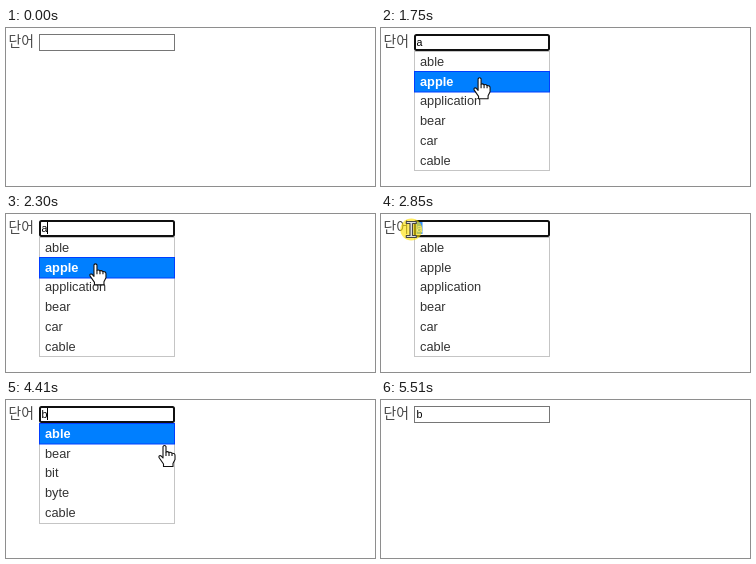
An HTML page that plays this animation: 369x158 px, repeating every 5640 ms.

```html
<!DOCTYPE html>
<html lang="ko">
<head>
<meta charset="utf-8">
<title>Autocomplete</title>
<style>
html, body { margin: 0; width: 100%; height: 100%; overflow: hidden; background: #fff; }
svg { display: block; width: 369px; height: 158px; }
text { font-family: "Liberation Sans", Arial, sans-serif; white-space: pre; }
.label { font: 300 13.8px "Noto Sans CJK KR", "Noto Sans CJK", sans-serif; fill: #444; }
.value { font-size: 10.67px; fill: #000; }
.value.picked { fill: #fff; }
.row text { font-size: 12.8px; fill: #333; }
.row rect { fill: #007fff; stroke: #003eff; visibility: hidden; }
.row.active text { fill: #fff; font-weight: bold; }
.row.active rect { visibility: visible; }
.cursor { fill: #fff; stroke: #111; stroke-width: 1.1; stroke-linejoin: round; }
</style>
</head>
<body>
<svg viewBox="0 0 369 158">
  <text class="label" x="2.5" y="17.5">단어</text>
  <g id="list"></g>
  <rect id="field" fill="#fff"/>
  <rect id="pick" x="35.5" y="8" width="6" height="12" fill="#3390ff"/>
  <text id="value" class="value" x="35.5" y="18"></text>
  <rect id="caret" y="8" width="1" height="12"/>
  <circle id="press" r="11" fill="#ffe100" fill-opacity=".62"/>
  <g id="pointer" class="cursor">
    <path id="arrow" d="M0 0V16L3.7 12.5L6.2 18.3L8.6 17.2L6.2 11.6H11.3Z"/>
    <path id="beam" fill="#ddd" stroke="#444" d="M-5-8H5V-6H1.3V6H5V8H-5V6H-1.3V-6H-5Z"/>
    <g id="hand" transform="translate(0 1.5)">
      <path d="M-1.5 1.5Q0-.5 1.5 1.5V7Q3 6 4.5 7.5Q6 6.7 7.5 8.2Q10.5 8 10.5 10.5V14.5L8.5 18.5V21.5H-1V19L-5.5 12.5Q-6 10-3.5 10.8L-1.5 13Z"/>
      <path fill="none" d="M1.5 7V11M4.5 7.5V11M7.5 8.2V11"/>
    </g>
  </g>
</svg>
<script>
const LOOP = 5640, STEP = 68.75, ROW = 19.7;
const $ = id => document.getElementById(id);
const show = (id, on) => $(id).style.display = on ? '' : 'none';
const set = (id, attrs) => {
  for (const k in attrs) $(id).setAttribute(k, attrs[k]);
};

const lists = {
  a: ['able', 'apple', 'application', 'bear', 'car', 'cable'],
  b: ['able', 'bear', 'bit', 'byte', 'cable']
};

// Pointer paths: each is a run of [ms, x, y], held until its end time.
const paths = [
  { end: 1410, keys: [[70, 298, 140], [280, 185, 68], [480, 95, 8.5]] },
  { end: 2030, keys: [[1410, 95, 8.5], [1750, 98.5, 46.5], [1960, 103, 120]] },
  { end: 2780, keys: [[2030, 103, 135], [2300, 90, 48.5], [2580, 60, 12]] },
  { end: 3210, keys: [[2780, 46, 13], [2850, 30, 15.5], [2990, 15, 14]] },
  { end: 5240, keys: [[4410, 158.5, 43.5], [4620, 232, 75], [4970, 318, 140], [5240, 308, 160]] }
];

function pointerAt(t) {
  const path = paths.find(p => t >= p.keys[0][0] && t < p.end);
  if (!path) return null;
  const { keys } = path, start = keys[0][0];
  const q = start + STEP * Math.floor((t - start) / STEP + .1);
  const i = keys.findIndex(k => k[0] > q);
  if (i < 0) return keys[keys.length - 1].slice(1);
  const [t0, x0, y0] = keys[i - 1], [t1, x1, y1] = keys[i];
  const f = (q - t0) / (t1 - t0);
  return [x0 + (x1 - x0) * f, y0 + (y1 - y0) * f];
}

const listAt = t => t < 1210 || t >= 5510 ? null : t < 3410 ? 'a' : 'b';

function rowAt(t) {
  const p = pointerAt(t), items = lists[listAt(t)];
  if (!p || !items || p[0] < 33 || p[0] > 169) return -1;
  const i = Math.floor((p[1] - 24) / ROW);
  return i < items.length ? i : -1;
}

// The highlight lingers briefly after the pointer leaves the list.
function activeRow(t) {
  for (let k = 0; k < 4; k++) {
    const row = rowAt(t - k * STEP);
    if (row >= 0) return row;
  }
  return -1;
}

let shown;
function drawList(name, active) {
  const state = name + active;
  if (state === shown) return;
  shown = state;
  const items = lists[name] || [];
  const row = (word, i) => `<g class="row ${i === active ? 'active' : ''}">
    <rect x="33.5" y="${Math.round(23 + ROW * i) + .5}" width="135" height="20.5"/>
    <text x="39" y="${38 + ROW * i}">${word}</text></g>`;
  $('list').innerHTML = name
    ? `<rect x="33.5" y="23.5" width="135" height="${Math.round(items.length * ROW + 1)}" fill="#fff" stroke="#c5c5c5"/>`
      + items.map(row).join('')
    : '';
}

function drawField(t, hover) {
  const focus = t >= 680 && t < 5510;
  set('field', focus
    ? { x: 34, y: 7, width: 134, height: 15, rx: 1.5, stroke: '#101010', 'stroke-width': 2 }
    : { x: 33.5, y: 6.5, width: 135, height: 16, rx: 0, stroke: hover ? '#4f4f4f' : '#767676', 'stroke-width': 1 });
  const picked = t >= 2850 && t < 3080;
  const typed = t < 880 ? 680 : t < 3080 ? 880 : 3080;
  $('value').textContent = t < 880 ? '' : t < 3080 ? 'a' : 'b';
  $('value').classList.toggle('picked', picked);
  show('pick', picked);
  set('caret', { x: t < 880 ? 35 : 41 });
  show('caret', focus && !picked && Math.floor((t - typed) / 530) % 2 === 0);
}

function drawPointer(t, p, hover) {
  show('pointer', p);
  const down = t >= 680 && t < 780 || t >= 2780 && t < 3080;
  show('press', p && down);
  if (!p) return;
  set('pointer', { transform: `translate(${p})` });
  set('press', { cx: p[0], cy: p[1] });
  const beam = hover || down;
  const hand = !beam && rowAt(t) >= 0;
  show('beam', beam);
  show('hand', hand);
  show('arrow', !beam && !hand);
}

function draw(now) {
  const t = now % LOOP, p = pointerAt(t);
  const hover = p && p[0] > 33 && p[0] < 169 && p[1] > 6 && p[1] < 23;
  drawList(listAt(t), activeRow(t));
  drawField(t, hover);
  drawPointer(t, p, hover);
}

const begin = performance.now();
function tick() {
  draw(performance.now() - begin);
  requestAnimationFrame(tick);
}
tick();
</script>
</body>
</html>
```
